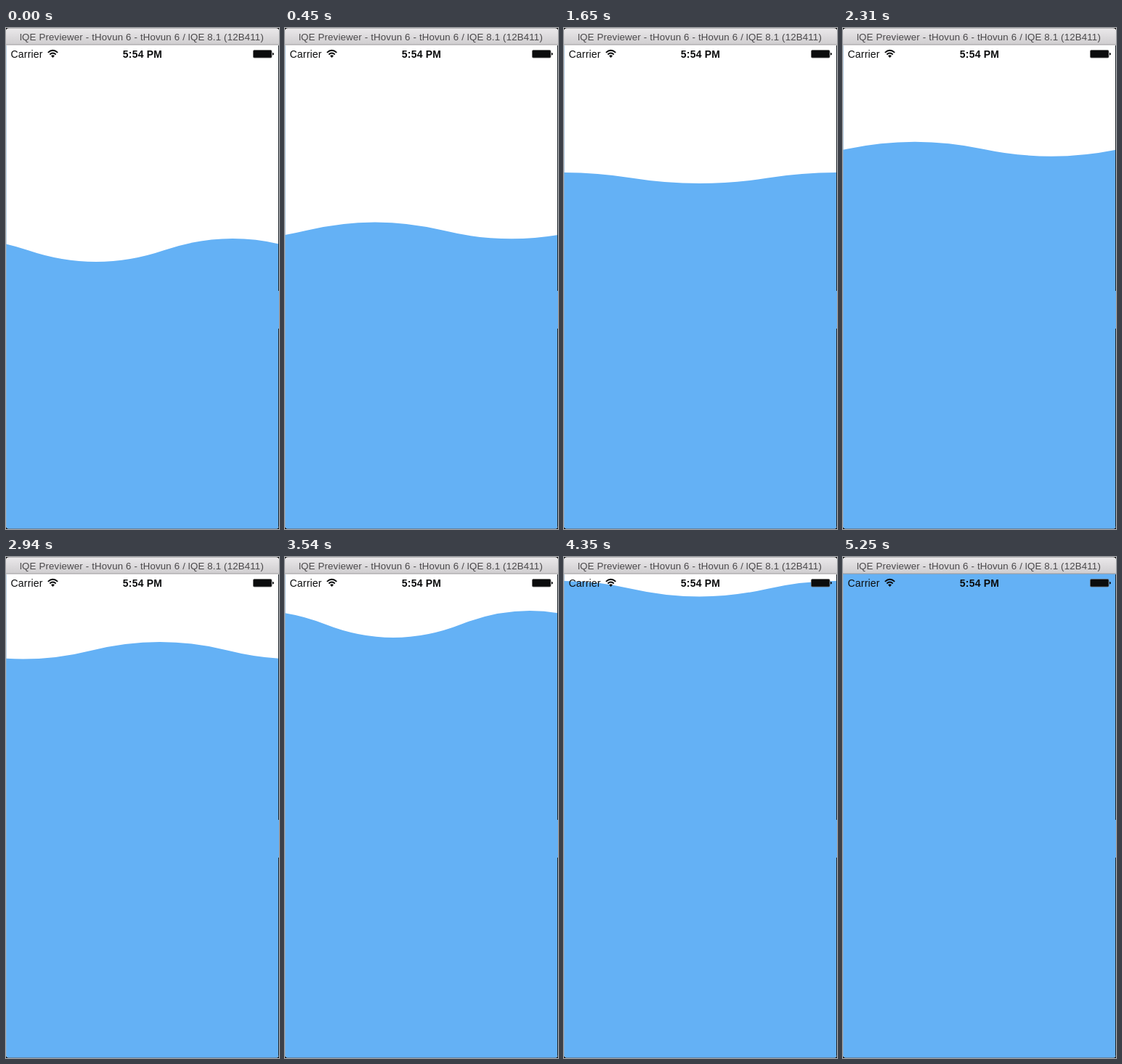
Animation of 376 by 690 pixels, one loop 5.88 s. Source, as an HTML page:

```html
<!DOCTYPE html>
<html lang="en">
<head>
<meta charset="utf-8">
<title>Rising water</title>
<style>
  html, body { margin: 0; width: 100%; height: 100%; overflow: hidden; background: #111; }
  svg { display: block; width: 376px; height: 690px; }
  text { font-family: "Liberation Sans", Arial, sans-serif; }
</style>
</head>
<body>
<svg viewBox="0 0 376 690">
  <defs>
    <linearGradient id="bar" x2="0" y2="1">
      <stop offset="0" stop-color="#ebe9eb"/>
      <stop offset="1" stop-color="#cfcdcf"/>
    </linearGradient>
    <clipPath id="window"><rect y="0.5" width="376" height="689" rx="4"/></clipPath>
  </defs>
  <g clip-path="url(#window)">
    <rect width="376" height="690" fill="#fff"/>
    <path id="water" fill="#64b1f5"/>
    <path d="M0.5 24V690" stroke="#8db4d6" stroke-opacity=".6"/>
    <path d="M375.5 24V362M375.5 414V690" stroke="#20262c"/>
    <path d="M0 689.5H376" stroke="#4d7599"/>
    <rect width="376" height="23" fill="url(#bar)"/>
    <path d="M0 23H376" stroke="#9b999b"/>
  </g>

  <text x="187" y="17.2" font-size="13.3" letter-spacing=".15" text-anchor="middle" fill="#4a484a">lQE Previewer - tHovun 6 - tHovun 6 / lQE 8.1 (12B411)</text>
  <g fill="#0b0c0d">
    <text x="6.5" y="41" font-size="14" letter-spacing=".2">Carrier</text>
    <text x="188" y="41" font-size="14" letter-spacing=".2" font-weight="bold" text-anchor="middle">5:54 PM</text>
    <path d="M64.5 41L62 38.3Q64.5 36.2 67 38.3Z"/>
    <rect x="340.5" y="30.5" width="25.5" height="10.5" rx="1.5" stroke="#666" stroke-width=".8"/>
    <path d="M367 34Q369 34.2 369 35.8T367 37.6Z"/>
  </g>
  <path d="M60.3 36.5Q64.5 32.7 68.7 36.5M57.8 33.9Q64.5 27.8 71.2 33.9" fill="none" stroke="#0b0c0d" stroke-width="1.9"/>
</svg>
<script>
const LOOP = 5880, STEP = 30, FULL_AT = 5010;
const WAVELENGTH = 376, HALF = WAVELENGTH / 2, ROLL_PERIOD = 900;
const water = document.getElementById('water');

// [time in ms, wave height in px]
const swell = [[0, 16], [900, 6.75], [1080, 5.8], [1650, 7.5], [1850, 9.2], [2310, 10],
  [3000, 12], [3540, 18.5], [3660, 20], [4350, 10.75], [FULL_AT, 18.8]];

function amplitudeAt(t) {
  const i = swell.findIndex(([time]) => time > t);
  const [t0, a0] = swell[i - 1], [t1, a1] = swell[i];
  return a0 + (a1 - a0) * (t - t0) / (t1 - t0);
}

function waterPath(t) {
  if (t >= FULL_AT) return 'M0 23H376V690H0Z';
  const level = 306 - 0.0603 * t;
  const bend = 2 * amplitudeAt(t);
  const roll = WAVELENGTH * (t % ROLL_PERIOD) / ROLL_PERIOD;
  let d = `M${30 - WAVELENGTH - roll} ${level}`;
  // alternating parabolic troughs and crests
  for (let i = 0; i < 6; i++) {
    d += `q${HALF / 2} ${i % 2 ? -bend : bend} ${HALF} 0`;
  }
  return d + 'V690H-800Z';
}

function draw() {
  const t = Math.floor(performance.now() % LOOP / STEP) * STEP;
  water.setAttribute('d', waterPath(t));
  requestAnimationFrame(draw);
}
draw();
</script>
</body>
</html>
```
